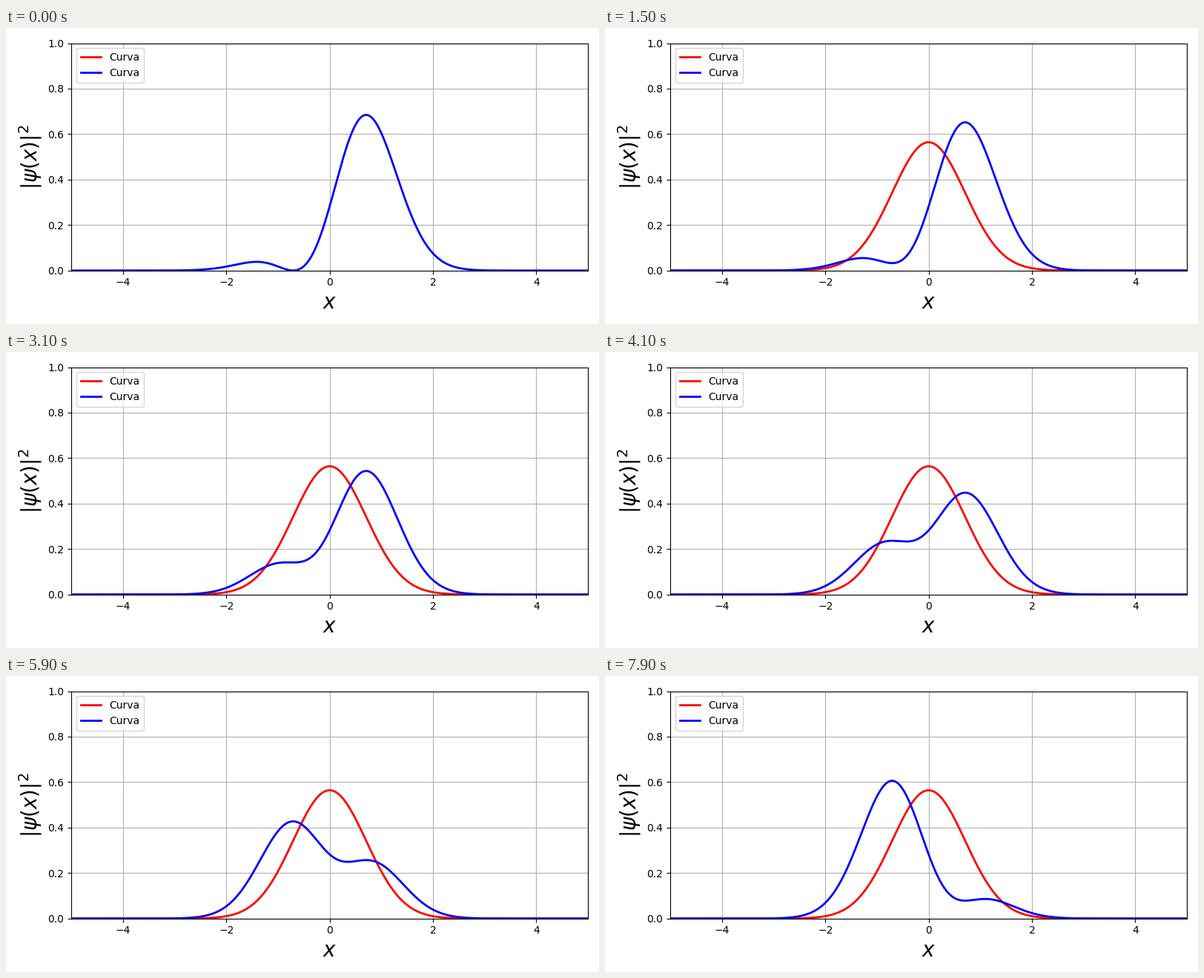
Recreate the animation shown at these times as a matplotlib script. Size 800 by 400 pixels, loop 8000 ms.

```python
import numpy as np
import matplotlib.pyplot as plt
from matplotlib.animation import FuncAnimation

FRAMES = 80
INTERVAL = 100
PHASE_STEP = np.pi / 100

x = np.linspace(-5, 5, 1000)
ground = np.exp(-x**2) / np.sqrt(np.pi)


def superposition(phase):
    """Density of an equal mix of the two lowest oscillator states."""
    return ground * (0.5 + x**2 + np.sqrt(2) * x * np.cos(phase))


fig, ax = plt.subplots(figsize=(8, 4), dpi=100)
red, = ax.plot([], [], color="red", lw=2, label="Curva")
blue, = ax.plot([], [], color="blue", lw=2, label="Curva")

ax.set_xlim(-5, 5)
ax.set_ylim(0, 1)
ax.set_xlabel(r"$x$", fontsize=20)
ax.set_ylabel(r"$|\psi(x)|^2$", fontsize=20)
ax.grid(True)
ax.legend(loc="upper left")
fig.tight_layout()


def update(i):
    # The stationary state joins after the opening frame.
    if i == 0:
        red.set_data([], [])
    else:
        red.set_data(x, ground)
    blue.set_data(x, superposition(PHASE_STEP * max(i - 1, 0)))
    return red, blue


anim = FuncAnimation(fig, update, frames=FRAMES, interval=INTERVAL,
                     repeat=True, repeat_delay=0)
plt.show()
```
